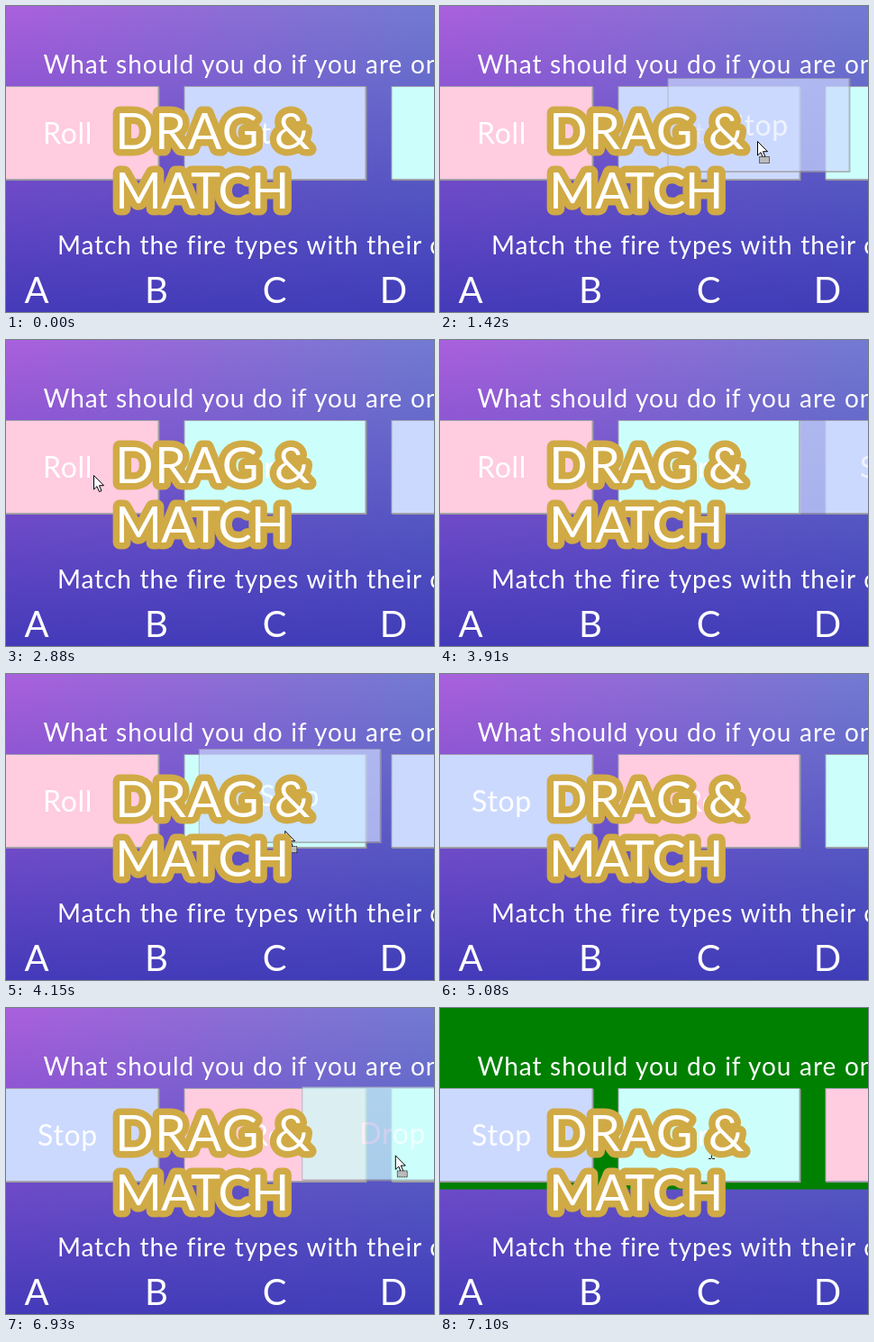
An HTML page for the animation above (7.47 s loop, 475 by 340 pixels).

```html
<!DOCTYPE html>
<html lang="en">
<head>
<meta charset="utf-8">
<title>Drag &amp; Match</title>
<style>
  html, body { margin: 0; width: 100%; height: 100%; overflow: hidden; }
  svg { display: block; width: 475px; height: 340px; font-family: Lato, "Open Sans", sans-serif; fill: #fff; }
  .line { font-size: 28px; letter-spacing: .9px; word-spacing: .7px; }
  .letters { font-size: 40px; text-anchor: middle; }
  .card rect { stroke: #a3a3b0; filter: drop-shadow(1px 1px .6px #999); }
  .card text { font-size: 32px; letter-spacing: .7px; text-anchor: middle; }
  .title { font-size: 56px; stroke: #d0aa45; stroke-width: 15px; stroke-linejoin: round; paint-order: stroke; }
</style>
</head>
<body>
<svg viewBox="0 0 475 340">
  <defs>
    <linearGradient id="across">
      <stop stop-color="#aa60dc"/><stop offset="1" stop-color="#727bd1"/>
    </linearGradient>
    <linearGradient id="down" x2="0" y2="1">
      <stop stop-color="#3b37b6" stop-opacity="0"/><stop offset="1" stop-color="#3b37b6" stop-opacity=".92"/>
    </linearGradient>
  </defs>
  <rect width="475" height="340" fill="url(#across)"/>
  <rect width="475" height="340" fill="url(#down)"/>
  <rect id="correct" width="475" height="201.5" fill="#008000"/>

  <text class="line" x="41.5" y="75">What should you do if you are on fire?</text>
  <text class="line" x="57" y="276">Match the fire types with their classes</text>
  <g class="letters">
    <text x="34" y="330">A</text><text x="167" y="330">B</text>
    <text x="298" y="330">C</text><text x="430" y="330">D</text>
  </g>

  <g id="Roll" class="card"><rect x="-100.5" y="89.5" width="201" height="103" fill="#ffcce0"/><text y="153">Roll</text></g>
  <g id="Stop" class="card"><rect x="-100.5" y="89.5" width="201" height="103" fill="#ccd9ff"/><text y="153">Stop</text></g>
  <g id="Drop" class="card"><rect x="-100.5" y="89.5" width="201" height="103" fill="#ccfffc"/><text y="153">Drop</text></g>
  <use id="ghost" opacity=".7"/>

  <g id="cursor" stroke="#000">
    <path d="M.5 .5V16L4 12.7L6.5 18.5L9 17.5L6.5 11.7H11.5Z"/>
    <rect id="badge" x="2.5" y="17.5" width="11" height="7" fill="#bbb" stroke-dasharray="1 1"/>
  </g>
  <path id="beam" d="M298 167.5h3m1 0h3M301.5 167V152" stroke="#222" fill="none"/>

  <g class="title">
    <text x="121" y="159" letter-spacing="1.4">DRAG &amp;</text>
    <text x="121" y="225" letter-spacing="-1">MATCH</text>
  </g>
</svg>
<script>
const LOOP = 7470;
const el = id => document.getElementById(id);

const orders = [
  { at: 0, cards: ['Roll', 'Stop', 'Drop'] },
  { at: 1870, cards: ['Roll', 'Drop', 'Stop'] },
  { at: 4450, cards: ['Stop', 'Roll', 'Drop'] },
  { at: 7100, cards: ['Stop', 'Drop', 'Roll'] }
];

// The pointer keeps its last position until `hide`.
const hovers = [
  { start: 150, end: 550, steps: 6, hide: 700, from: [446, 172], to: [281, 165] },
  { start: 700, end: 1020, steps: 5, hide: 1420, from: [283, 164], to: [297, 160] },
  { start: 2170, end: 2880, steps: 10, hide: 2960, from: [463, 200], to: [97, 150] },
  { start: 2960, end: 3280, steps: 5, hide: 3280, from: [91, 145], to: [331, 160] },
  { start: 4450, end: 4600, steps: 2, hide: 4620, from: [63, 180], to: [63, 180] },
  { start: 4620, end: 5080, steps: 7, hide: 5080, from: [80, 187], to: [311, 168] }
];

// Offsets are relative to the resting card; `grab` is where it was picked up.
const drags = [
  { card: 'Stop', start: 1420, end: 1870, steps: 7, grab: [297, 159], from: [55, -9], to: [225, -14] },
  { card: 'Stop', start: 3910, end: 4450, steps: 8, grab: [523, 180], from: [-29, 0], to: [-460, -14] },
  { card: 'Drop', start: 6700, end: 7100, steps: 6, grab: [531, 165], from: [-12, 0], to: [-230, -4] }
];

function position({ start, end, steps, from, to }, t) {
  const p = Math.min(1, Math.floor((t - start) / (end - start) * (steps - 1) + 1e-6) / (steps - 1));
  return from.map((v, i) => v + (to[i] - v) * p);
}

const show = (id, visible) => el(id).setAttribute('visibility', visible ? 'visible' : 'hidden');
const place = (id, x, y) => el(id).setAttribute('transform', `translate(${x} ${y})`);

function draw(t) {
  const { cards } = orders.findLast(o => t >= o.at);
  cards.forEach((id, slot) => place(id, 68.5 + 230 * slot, 0));

  const solved = t >= 7100;
  show('correct', solved);
  show('beam', solved);

  const drag = drags.find(d => t >= d.start && t < d.end);
  const hover = hovers.find(h => t >= h.start && t < h.hide);
  show('ghost', drag);
  show('badge', drag);
  show('cursor', drag || hover);

  if (drag) {
    const [dx, dy] = position(drag, t);
    el('ghost').setAttribute('href', '#' + drag.card);
    place('ghost', dx, dy);
    place('cursor', drag.grab[0] + dx, drag.grab[1] + dy);
  } else if (hover) {
    place('cursor', ...position(hover, t));
  }
}

const origin = performance.now();
function tick() {
  draw((performance.now() - origin) % LOOP);
  requestAnimationFrame(tick);
}
tick();
</script>
</body>
</html>
```
